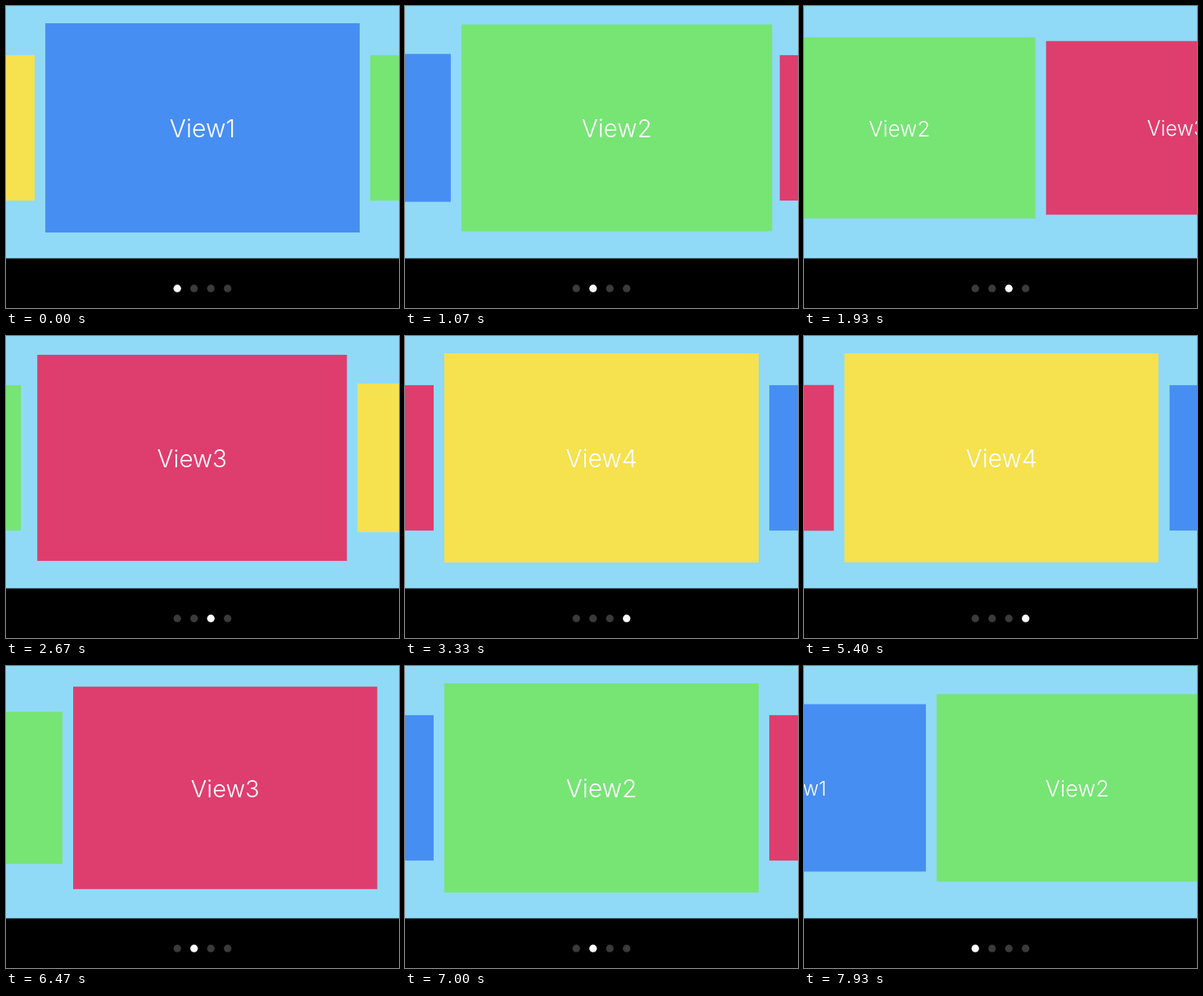
An HTML page with a canvas for the animation above (8000 ms loop, 480 by 368 pixels).

```html
<!DOCTYPE html>
<html lang="en">
<head>
<meta charset="utf-8">
<title>Card carousel</title>
<style>
html, body { margin: 0; width: 480px; height: 368px; overflow: hidden; background: #000; }
canvas { display: block; }
</style>
</head>
<body>
<canvas id="stage" width="480" height="368"></canvas>
<script>
const ctx = document.getElementById('stage').getContext('2d');
const LOOP = 8000;
const COLORS = ['#478ef3', '#76e574', '#de3e6d', '#f6e14f'];
const CARD = { width: 384, height: 255, x: 240, y: 148.5 };
const SPACING = 338.4, SIDE_SCALE = 0.695;
const RELEASE_DELAY = 85;

// Each swipe: start time, starting card, direction.
const SWIPES = [
  [670, 0, 1], [1740, 1, 1], [2600, 2, 1], [3490, 3, 1],
  [4420, 4, -1], [5374, 3, -1], [6373, 2, -1], [7764, 1, -1]
].map(([start, from, dir]) => ({ start, from, dir }));

const wrap = i => (i + COLORS.length) % COLORS.length;
const swipeEase = ms => 1 - Math.exp(-Math.pow(Math.max(0, ms) / 262, 2.5));

function drawCard(index, x, scale) {
  ctx.save();
  ctx.translate(x, CARD.y);
  ctx.scale(scale, scale);
  ctx.fillStyle = COLORS[index];
  ctx.fillRect(-CARD.width / 2, -CARD.height / 2, CARD.width, CARD.height);
  ctx.fillStyle = '#fff';
  ctx.font = '300 30px Inter, Roboto, sans-serif';
  ctx.textAlign = 'center';
  ctx.fillText('View' + (index + 1), 0, 11.8);
  ctx.restore();
}

function drawDots(active) {
  for (let i = 0; i < COLORS.length; i++) {
    ctx.fillStyle = i === active ? '#fff' : '#3b3b3b';
    ctx.beginPath();
    ctx.arc(209.2 + i * 20.5, 344.2, 4.6, 0, Math.PI * 2);
    ctx.fill();
  }
}

function draw(time) {
  const swipe = SWIPES.filter(s => s.start <= time).pop() || SWIPES[0];
  const { from, dir } = swipe;
  const elapsed = time - swipe.start;
  const shift = swipeEase(elapsed);
  const progress = shift * (4 - shift) / 3; // scaling runs ahead of the slide

  ctx.fillStyle = '#000';
  ctx.fillRect(0, 0, 480, 368);
  ctx.fillStyle = '#90daf8';
  ctx.fillRect(0, 0, 480, 307.5);

  for (let step = -1; step <= 2; step++) {
    const inner = step === 0 || step === 1;
    const x = CARD.x + dir * SPACING * (step - (inner ? shift : progress));
    const focus = step === 0 ? 1 - progress : step === 1 ? progress : 0;
    drawCard(wrap(from + dir * step), x, SIDE_SCALE + (1 - SIDE_SCALE) * focus);
  }
  drawDots(wrap(elapsed >= RELEASE_DELAY ? from + dir : from));
}

function tick() {
  draw(performance.now() % LOOP);
  requestAnimationFrame(tick);
}
tick();
</script>
</body>
</html>
```
